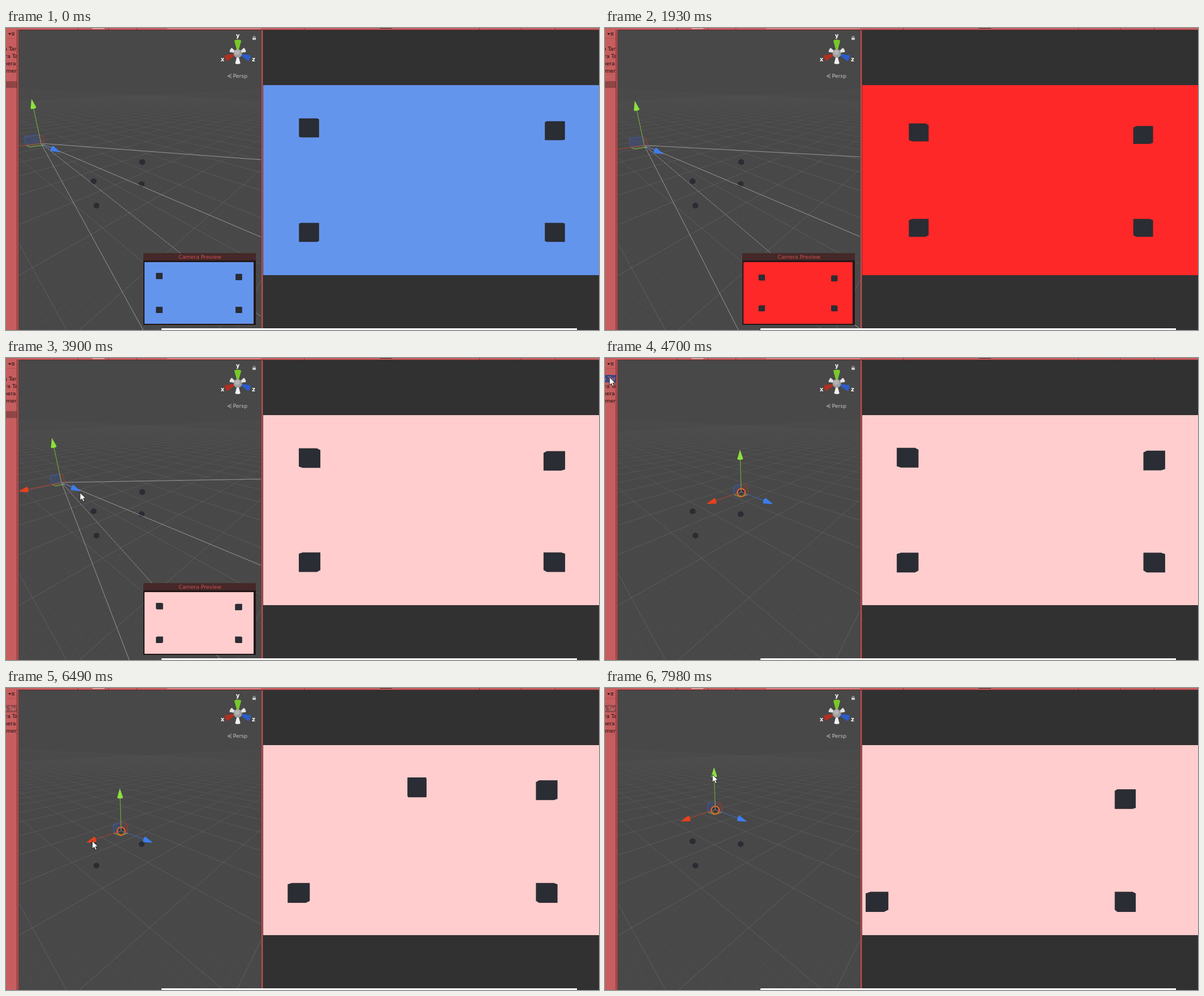
Write an HTML page with a canvas that moves like this. It is 1049 by 534 pixels and loops after 8000 ms.

```html
<!DOCTYPE html>
<html lang="en">
<head>
<meta charset="utf-8">
<title>Camera follow</title>
<style>
html, body { margin: 0; width: 100%; height: 100%; overflow: hidden; background: #313131; }
canvas { display: block; }
</style>
</head>
<body>
<canvas id="stage" width="1049" height="534"></canvas>
<script>
const c = document.getElementById('stage').getContext('2d');
const LOOP = 8000, BLEND = 890, CUT = 1705, SELECT = 4600;
const FONT = '9.3px "DejaVu Sans", sans-serif', BOLD = 'bold 10px "DejaVu Sans", sans-serif';
const DARK = '#2b2d34', FRAME = '#c65d5e';
const BLUE = [100, 149, 237], PLUM = [162, 65, 108], RED = [255, 0, 0], PINK = [255, 205, 205];
let t = 0;

// Progress from 0 to 1 between two times.
const ramp = (from, to) => Math.min(1, Math.max(0, (t - from) / (to - from)));
const add = (a, b) => a.map((v, i) => v + b[i]);
const mul = (p, k) => p.map(v => v * k);
const mix = (a, b, k) => a.map((v, i) => v + (b[i] - v) * k);

function rect(color, x, y, w, h) {
  c.fillStyle = color;
  c.fillRect(x, y, w, h);
}

function poly(points, fill, stroke) {
  c.beginPath();
  points.forEach(p => c.lineTo(...p));
  c.closePath();
  c.fillStyle = fill;
  c.fill();
  if (!stroke) return;
  c.strokeStyle = stroke;
  c.lineWidth = 1;
  c.stroke();
}

function line(color, ...points) {
  c.beginPath();
  points.forEach(p => c.lineTo(...p));
  c.strokeStyle = color;
  c.lineWidth = 1;
  c.stroke();
}

function ring(color, x, y, r, width, from = 0) {
  c.beginPath();
  c.arc(x, y, r, from, 2 * Math.PI);
  c.strokeStyle = color;
  c.lineWidth = width;
  c.stroke();
}

function disc(color, x, y, r) {
  c.beginPath();
  c.arc(x, y, r, 0, 7);
  c.fillStyle = color;
  c.fill();
}

function text(s, x, y, color, align = 'left', font = FONT) {
  c.font = font;
  c.fillStyle = color;
  c.textAlign = align;
  c.fillText(s, x, y);
}

function clipped(x, y, w, h, draw) {
  c.save();
  c.beginPath();
  c.rect(x, y, w, h);
  c.clip();
  draw();
  c.restore();
}

function cone(color, base, tip, r) {
  const dx = tip[0] - base[0], dy = tip[1] - base[1], n = Math.hypot(dx, dy);
  const side = [-dy / n * r, dx / n * r];
  poly([tip, add(base, side), add(base, mul(side, -1))], color);
  c.beginPath();
  c.ellipse(...base, r * .4, r, Math.atan2(dy, dx), 0, 7);
  c.fill();
}

// Motion of the selected objects and of the mouse.
const cameraAt = () => add([62, 204], add(mul([26, 12], ramp(1720, 2450)), mul([10, 4], ramp(3400, 3900))));
const slide = () => ramp(5820, 6610);
const rise = () => ramp(7500, 7980);
const cubeAt = () => add([241, 237], add(mul([-44, 18], slide()), mul([-2, -40], rise())));

function mouseAt() {
  let p = [720, 540];
  const go = (from, to, goal) => { p = mix(p, goal, ramp(from, to)); };
  go(2200, 2620, [554, 236]);
  go(2620, 3100, add(cameraAt(), [33, 18]));
  go(4200, 4550, [8, 34]);
  go(4850, 5400, add(cubeAt(), [-51, 18]));
  go(6800, 7400, add(cubeAt(), [-5, -62]));
  return p;
}

// Colour and lens of the game view.
function sky() {
  if (t < 1530) return mix(BLUE, PLUM, ramp(BLEND, 1530));
  return t < CUT ? mix(PLUM, RED, ramp(1530, CUT)) : mix(RED, PINK, ramp(CUT, 2857));
}

const wideLens = { zoom: 219, depth: .985 };

function lens() {
  if (t >= CUT) return { zoom: 222.5 - 26.6 * Math.exp((CUT - t) / 1036), depth: .972 };
  const p = ramp(BLEND, 1530);
  return { zoom: 219 + 23.5 * p, depth: .985 + .015 * p };
}

// One box: front face plus the depth that shrinks to the centre.
function box(x, y, h, depth) {
  c.fillStyle = DARK;
  for (let i = 0; i <= 6; i++) {
    const k = 1 + (depth - 1) * i / 6;
    c.fillRect((x - h) * k, (y - h) * k, 2 * h * k, 2 * h * k);
  }
}

function game(color, { zoom, depth }, x, y, w, h) {
  clipped(x, y, w, h, () => {
    rect(`rgb(${color.map(Math.round)})`, x, y, w, h);
    c.translate(x + w / 2, y + h / 2);
    c.scale(w / 597, w / 597);
    const s = zoom / 219, half = Math.min(17, 16.2 * s);
    const panX = -53.5 * ramp(5940, 7720), panY = 16 * rise();
    const put = (px, py) => box(px * s + panX, py * s + panY, half, depth);
    put(-219 + 246 * slide(), -93 - 193 * rise());
    put(219, -88);
    put(-219, 93);
    put(219, 93);
  });
}

function preview() {
  rect('#241617', 243, 398, 199, 127);
  rect('#452829', 243, 398, 199, 13);
  text('Camera Preview', 343, 408, '#d2504f', 'center');
  const early = t < CUT;
  game(early ? mix(BLUE, RED, ramp(BLEND, 1300)) : sky(), early ? wideLens : lens(), 245, 414, 193, 109);
}

function fade(...stops) {
  const g = c.createLinearGradient(0, 100, 0, 534);
  stops.forEach(([p, a]) => g.addColorStop(p, `rgba(180,180,180,${a})`));
  return g;
}

// Two families of floor lines, each from its own vanishing point.
function grid() {
  const major = fade([0, 0], [.04, .015], [.15, .07], [.4, .17], [1, .22]);
  const minor = fade([.3, 0], [1, .04]);
  for (let j = -30; j < 300; j++) {
    const big = j % 10 === 0;
    if (!big && j > 40) continue;
    const color = big ? major : minor, x = 27.8 * j;
    line(color, [-131, 100], [385 + x, 534]);
    line(color, [620, 100], [130 - x, 534]);
  }
}

function smallCube(x, y) {
  const corner = i => [x + 5.8 * Math.sin(i * Math.PI / 3), y + 5.4 * Math.cos(i * Math.PI / 3)];
  poly([0, 1, 2, 3, 4, 5].map(corner), DARK);
}

function handle(o, X, Y, Z) {
  const face = (a, b, color, fill) => poly([o, add(o, a), add(o, add(a, b)), add(o, b)], fill, color);
  const [x, y, z] = [mul(X, .25), mul(Y, .22), mul(Z, .25)];
  face(x, z, '#85b840', 'rgba(130,190,60,.12)');
  face(z, y, '#a83a30', 'rgba(190,50,40,.12)');
  face(x, y, '#3a5cab', 'rgba(50,80,180,.25)');
  const arrow = (v, stem, head) => {
    const n = Math.hypot(...v);
    line(stem, o, add(o, v));
    cone(head, add(o, mul(v, 1 - 7 / n)), add(o, mul(v, 1 + 9 / n)), 5);
  };
  arrow(X, '#b8412c', '#e8401c');
  arrow(Y, '#79b83e', '#8ce03c');
  arrow(Z, '#3d6ac0', '#3d7df0');
}

function frustum(o) {
  const p = Math.min(1, (o[0] - 62) / 28);
  const edge = (from, to) => {
    const end = mix(from, to, p);
    line('rgba(205,205,205,.6)', o, add(end, mix(end, o, 2)).map((v, i) => 3 * end[i] - v), end);
  };
  edge([452, 233], [452, 214]);
  edge([452, 370], [452, 367]);
  edge([242, 533], [218, 534]);
  c.setLineDash([4, 1]);
  edge([452, 511], [375, 528]);
  c.setLineDash([]);
}

function compass() {
  const o = [410, 45];
  const arm = (color, x, y, r) => cone(color, add(o, [x, y]), o, r);
  [-12, 12].forEach(x => arm('#e2e2e2', x, -6, 4));
  arm('#b03020', -20, 8, 5.5);
  arm('#2c5cc8', 20, 8, 5.5);
  arm('#78c82c', 0, -22, 6);
  arm('#f0f0f0', 0, 17, 4.5);
  disc('#9e9e9e', 410, 45, 7.5);
  disc('#b4b4b4', 409, 43, 4.5);
  text('y', 410, 17, '#fff', 'center', BOLD);
  text('x', 383, 59, '#fff', 'center', BOLD);
  text('z', 438, 59, '#fff', 'center', BOLD);
  rect('#c8c8c8', 436, 17, 6, 4);
  ring('#c8c8c8', 439, 16.5, 2, 1, Math.PI);
  line('#b4b4b4', [399, 81.5], [392, 85], [399, 88.5]);
  line('#a0a0a0', [392, 85], [399, 85]);
  text('Persp', 401.5, 88, '#c4c4c4');
}

function scene() {
  rect('#484848', 22, 4, 430, 530);
  grid();
  const cube = cubeAt();
  [[240, 276], [155, 271], [160, 314], cube].forEach(p => smallCube(...p));
  if (t < SELECT) {
    const o = cameraAt();
    frustum(o);
    handle(o, [-6600 / o[0], 14], [-15, -70], [26, 12]);
    preview();
  } else {
    handle(cube, [-53, 18], [-2, -66], [48, 18]);
    ring('#e8622a', cube[0], cube[1] + 1, 7, 2);
  }
  compass();
}

function sidebar() {
  rect(FRAME, 0, 0, 20, 534);
  rect('#b25253', 0, 18, 20, 1);
  poly([[4, 9], [9, 9], [6.5, 12.5]], '#2a1515');
  [8, 10, 12].forEach(y => rect('#3a1c1c', 10, y, 5, 1));
  const picked = t >= SELECT, ink = '#1c0d0d';
  if (picked) rect(t < 5850 ? '#3c4684' : '#97494a', 0, 30, 20, 13);
  else rect('#8f4546', 0, 94, 20, 12);
  clipped(0, 0, 19, 534, () => {
    text('Camera Tar', -34.5, 40, picked ? '#e08a86' : ink);
    text('Camera Tar', -28.5, 53, ink);
    text('Camera', -19, 66, ink);
    text('Camera', -12, 79, ink);
  });
}

function borders() {
  [19, 451].forEach(x => {
    rect('#6b3435', x, 0, 4, 534);
    rect('#b45354', x + 1, 0, 2, 534);
  });
  rect(FRAME, 0, 0, 1049, 3);
  rect('#5e2c2d', 22, 3, 1027, 1);
  rect('#d98081', 285, 0, 166, 2);
  rect('#e0a0a0', 153, 0, 21, 2);
  [127, 181, 231, 527, 837, 911, 971].forEach(x => rect('#7d3c3c', x, 0, 1, 3));
  rect('#4a2425', 661, 0, 22, 1);
  rect('#fff', 275, 531, 735, 3);
}

function pointer(x, y) {
  const shape = [[0, 0], [0, 14], [3.3, 11], [5.6, 16], [8, 15], [5.8, 10.2], [10, 10]];
  poly(shape.map(p => add(p, [x, y])), '#fff', '#222');
}

function draw(now) {
  t = now % LOOP;
  rect('#313131', 0, 0, 1049, 534);
  clipped(22, 4, 430, 530, scene);
  game(sky(), lens(), 455, 101, 597, 336);
  sidebar();
  borders();
  if (t > 2200) pointer(...mouseAt());
}

const start = performance.now();
function tick() {
  draw(performance.now() - start);
  requestAnimationFrame(tick);
}
tick();
</script>
</body>
</html>
```
